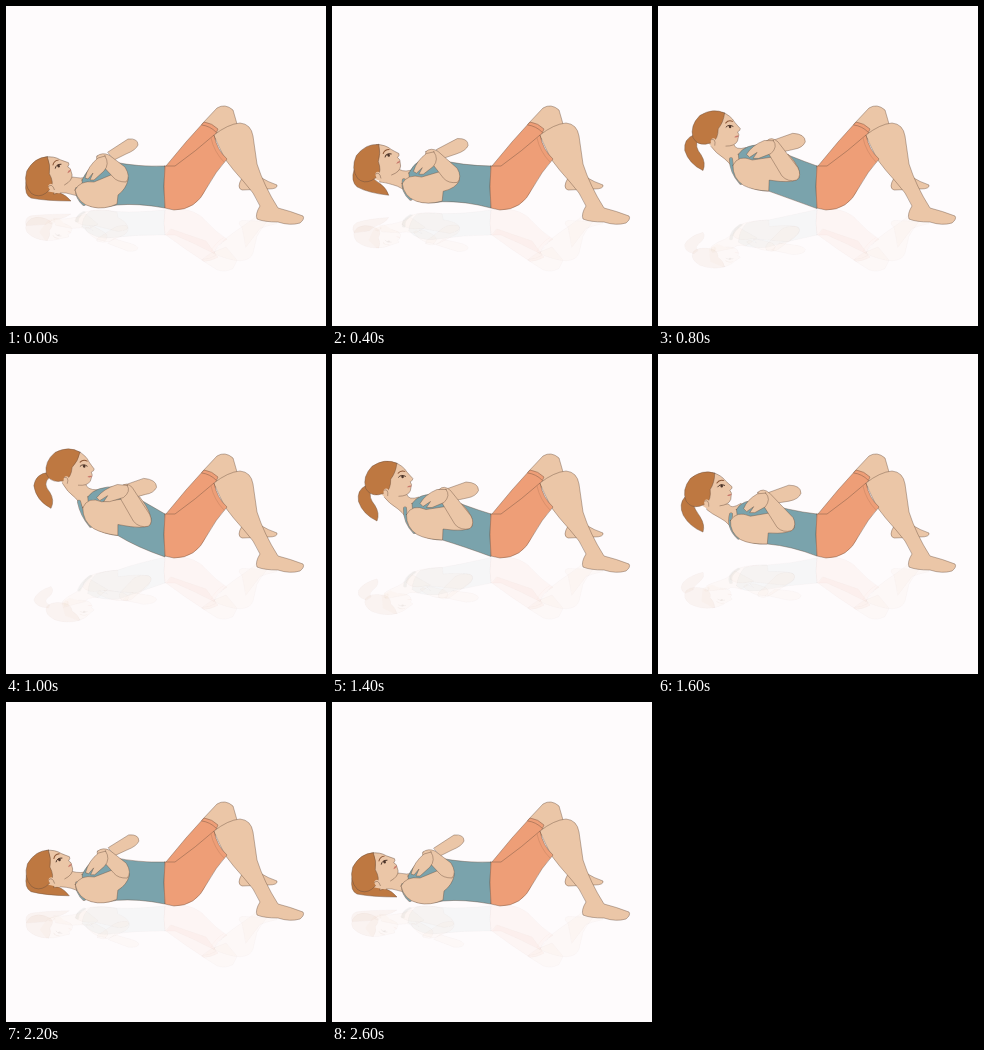
An HTML page with a canvas for the animation above (2700 ms loop, 320x320 px).

```html
<!DOCTYPE html>
<html lang="en">
<head>
<meta charset="utf-8">
<title>Crunch</title>
<style>
  html, body { margin: 0; width: 100%; height: 100%; overflow: hidden; background: #fefbfc; }
  canvas { display: block; width: 100vmin; height: 100vmin; }
</style>
</head>
<body>
<canvas id="stage" width="320" height="320"></canvas>
<script>
const ctx = document.getElementById('stage').getContext('2d');
const LOOP = 2700, STEP = 100;
const SKIN = '#ebc6a7', TEAL = '#7aa3ac', ORANGE = '#ee9e77', HAIR = '#be7841', LINE = 'rgba(105, 78, 62, .6)';

// Each moving part: lying, half raised, raised.
const parts = {
  ponytail: [
    'M20 176 Q18 189 25 192 Q40 195 65 195 Q60 189 54 187 Q46 186 40 178 Z',
    'M25 146 Q19 154 25 165 Q32 176 45 181 Q47 174 42 166 Q36 158 34 152 Z',
    'M43 117 Q30 118 28 130 Q30 145 45 153 Q49 145 44 137 Q36 128 44 122 Z'],
  neck: [
    'M50 176 L66 171 Q74 173 84 171 L92 178 L80 195 Q70 188 60 187 Q52 186 48 188 Z',
    'M50 150 L70 153 Q72 158 82 151 L95 165 L76 182 Q71 171 62 167 Q52 162 48 159 Z',
    'M58 118 L80 128 Q81 135 92 135 L102 148 L84 166 Q78 152 70 143 Q61 136 57 128 Z'],
  torso: [
    'M76 174 Q88 150 108 156 Q132 161 159 160 Q157 180 159 202 Q132 197 111 199 Q95 203 84 200 Q76 190 76 174 Z',
    'M78 157 Q84 146 100 149 Q130 158 159 160 Q157 180 159 202 Q134 192 109 191 Q95 192 86 187 Q80 176 78 157 Z',
    'M82 142 Q90 131 112 132 Q138 147 159 160 Q157 180 159 203 Q130 193 112 181 Q100 180 90 174 Q82 162 82 142 Z'],
  strap: [
    'M71 183 Q71 192 78 198', 'M73 162 Q69 175 80 185', 'M73 147 Q76 160 85 171'],
  farArm: [
    'M102 146 L122 133 Q132 132 132 139 Q130 144 120 148 L108 154 Z',
    'M108 140 L130 132 Q142 132 142 140 Q140 146 130 148 L116 150 Z',
    'M118 131 L138 124 Q151 125 151 133 Q148 139 140 140 L126 144 Z'],
  upperArm: [
    'M69 184 Q74 174 88 176 L112 166 Q123 168 122 174 Q120 183 112 189 L111 198 Q98 204 86 201 Q72 198 69 184 Z',
    'M72 168 Q78 158 92 164 L126 158 Q138 166 135 175 Q130 181 110 180 L109 191 Q92 192 82 187 Q71 180 72 168 Z',
    'M77 153 Q82 141 96 147 L134 142 Q148 160 145 170 Q140 176 112 170 L112 181 Q97 179 88 174 Q77 167 77 153 Z'],
  forearm: [
    'M91 150 Q96 146 103 149 L119 161 Q125 171 120 176 Q111 176 107 171 L94 157 Q89 153 91 150 Z',
    'M98 139 Q103 134 110 140 L134 164 Q138 171 133 177 Q124 180 118 174 L104 152 Q97 145 98 139 Z',
    'M116 132 Q121 127 127 133 L144 160 Q148 168 143 172 Q134 174 128 167 L116 146 Q112 138 116 132 Z'],
  hand: [
    'M99 150 L92 152 Q82 160 79 172 L82 173 L87 167 L84 174 L88 174 L98 165 Q104 158 99 150 Z',
    'M106 140 L98 141 Q88 147 85 156 L88 159 L95 154 L91 160 L96 160 L106 154 Q112 146 106 140 Z',
    'M122 131 L112 130 Q98 134 91 143 L94 146 L102 141 L98 147 L104 147 L118 143 Q126 137 122 131 Z']
};

const mix = (a, b, f) => a + (b - a) * f;

// Value at pose 0..2 between three keys.
function between(keys, pose) {
  const i = pose < 1 ? 0 : 1;
  return mix(keys[i], keys[i + 1], pose - i);
}

function morph(keys, pose) {
  const nums = keys.map(k => k.match(/[\d.]+/g).map(Number));
  let i = 0;
  return keys[0].replace(/[\d.]+/g, () => {
    const value = between(nums.map(n => n[i]), pose);
    i++;
    return value.toFixed(2);
  });
}

function shape(d, fill, stroke = LINE, width = 0.7) {
  const path = new Path2D(d);
  if (fill) { ctx.fillStyle = fill; ctx.fill(path); }
  if (stroke) { ctx.strokeStyle = stroke; ctx.lineWidth = width; ctx.stroke(path); }
}

function blob(x, y, rx, ry, color) {
  ctx.fillStyle = color;
  ctx.beginPath();
  ctx.ellipse(x, y, rx, ry, 0, 0, 7);
  ctx.fill();
}

function legs() {
  shape('M236 172 Q230 182 236 184 L262 183 Q272 183 271 179 Q262 176 254 171 L240 140 Z', SKIN);
  shape('M196 118 L211 102 Q219 97 227 104 L231 118 L220 140 L205 130 Z', SKIN);
  shape('M160 160 L180 136 L198 116 Q206 117 212 123 L200 150 L165 170 Z', ORANGE);
  shape('M196 119 Q204 120 210 126', null);
  shape('M208 129 Q222 118 234 117 Q245 118 247 130 L251 158 Q258 180 272 202 Q284 205 297 210 ' +
    'Q299 213 294 217 Q284 220 272 216 Q258 216 251 213 Q249 208 254 200 Q248 186 238 176 Q227 164 219 153 Z', SKIN);
  shape('M159 160 L169 160 Q190 145 208 129 Q211 144 221 153 Q210 165 200 183 Q190 204 168 204 L159 202 Q157 180 159 160 Z', ORANGE);
  shape('M205 132 Q208 146 218 156', null, '#d08a66');
}

function head(pose) {
  const face = 'M9 -18 Q17 -14 20 -7 Q22 -4 25 0 Q25 2 22 3 L23 6 Q22 9 21 12 Q18 17 9 16';
  ctx.save();
  ctx.translate(between([42, 48, 64], pose), between([171, 141, 114], pose));
  ctx.rotate(between([-35, -14, 0], pose) * Math.PI / 180);
  shape(face + ' L0 20 L-8 12 L-4 -10 Z', SKIN, null);
  shape(face, null);
  shape('M11 -17 Q0 -24 -14 -17 Q-25 -8 -23 4 Q-20 12 -11 12 L-4 11 Q2 8 3 -2 Q9 -8 11 -17 Z', HAIR);
  blob(-3, 11, 2.8, 4.2, SKIN);
  shape('M-5 8 Q0 7 -2 14', null);
  shape('M11 -7 Q14 -10 18 -8', null, '#8a5535', 1);
  shape('M11 -3 Q14 -6 18 -3', null, '#4b3429', 0.9);
  blob(15, -3, 1.3, 1.5, '#4b3429');
  shape('M18 8 Q20 6 23 7 Q22 9 18 8 Z', '#c9796b', null);
  ctx.restore();
}

// Rises until 1.1 s, sinks again by 2.4 s.
function poseAt(time) {
  const ease = f => 1 - Math.cos(Math.PI * Math.min(1, Math.max(0, f)));
  return Math.min(ease((time - 100) / 1000), 2 - ease((time - 900) / 1500));
}

function figure(pose) {
  const part = (name, ...style) => shape(morph(parts[name], pose), ...style);
  part('ponytail', HAIR);
  part('neck', SKIN);
  part('torso', TEAL);
  legs();
  part('farArm', SKIN);
  part('strap', null, LINE, 4);
  part('strap', null, TEAL, 2.8);
  part('upperArm', SKIN);
  part('forearm', SKIN);
  part('hand', SKIN);
  head(pose);
}

// Faint, flattened mirror image on the floor.
function reflection(pose) {
  ctx.save();
  ctx.beginPath();
  ctx.rect(0, 203, 320, 117);
  ctx.clip();
  ctx.globalAlpha = 0.06;
  ctx.translate(0, 325);
  ctx.scale(1, -0.6);
  figure(pose);
  ctx.restore();
}

function draw(time) {
  const pose = poseAt(time);
  ctx.clearRect(0, 0, 320, 320);
  ctx.lineJoin = ctx.lineCap = 'round';
  reflection(pose);
  figure(pose);
}

function frame() {
  const time = performance.now() % LOOP;
  draw(Math.floor(time / STEP) * STEP);
  requestAnimationFrame(frame);
}
frame();
</script>
</body>
</html>
```
